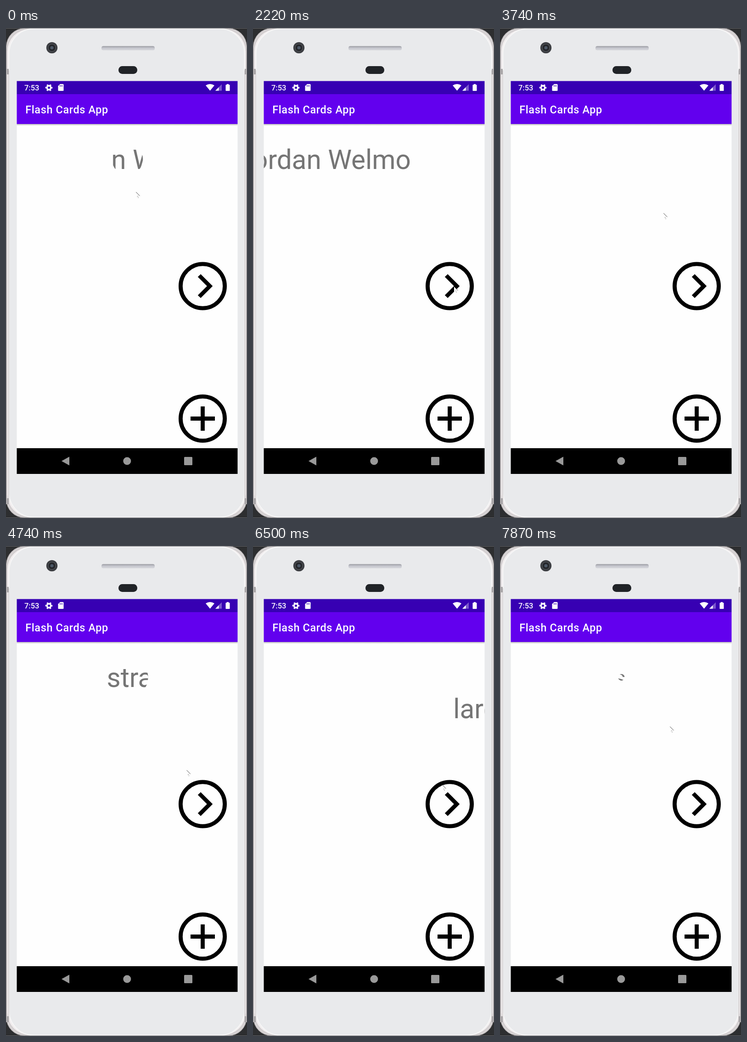
An HTML page that plays this animation: 525x1067 px, repeating every 7990 ms.

```html
<!DOCTYPE html>
<html lang="en">
<head>
<meta charset="utf-8">
<title>Flash cards</title>
<style>
  html, body { margin: 0; width: 100%; height: 100%; overflow: hidden; background: #2d2e30; }
  svg { display: block; width: 100%; height: 100%; font-family: Roboto, sans-serif; }
  #card { font-size: 58.45px; fill: #757575; text-anchor: middle; }
  .bar { fill: #fff; font-weight: 500; }
  .button { fill: none; stroke: #000; stroke-width: 8.8; }
</style>
</head>
<body>
<svg viewBox="0 0 525 1067">
  <defs>
    <linearGradient id="shade" x2="0" y2="1">
      <stop stop-color="#b8b8b8"/><stop offset="1" stop-color="#fefefe"/>
    </linearGradient>
    <linearGradient id="slot" x2="0" y2="1">
      <stop stop-color="#93949b"/><stop offset=".4" stop-color="#c3c4cb"/><stop offset="1" stop-color="#d6d7dc"/>
    </linearGradient>
    <clipPath id="screen"><path d="M23.5 209h481v706h-481z"/></clipPath>
    <clipPath id="reveal"><circle id="hole" cx="264.5" cy="286"/></clipPath>
  </defs>

  <!-- phone body -->
  <rect x=".5" y=".5" width="524" height="1066" rx="40" fill="#d6d2d3" stroke="#8d898b"/>
  <rect x="2" y="1.5" width="521" height="1064" rx="50" fill="#f1edee" stroke="#c4c0c2"/>
  <rect x="6.5" y="1.5" width="513" height="1064" rx="54" fill="#e9eaec" stroke="#f7f7f7" stroke-width="2"/>
  <path d="M6 92V1036M520 92V1036" stroke="#b5b1b3"/>
  <path d="M0 89h6v12H0zM0 1024h6v13H0zM520 89h5v12h-5zM520 1024h5v13h-5z" fill="#aaa7a9"/>
  <path d="M0 .5H525M0 1066.5H525" stroke="#66676a"/>
  <circle cx="100" cy="43" r="12.2" fill="#3c3e42"/>
  <circle cx="100" cy="43" r="8" fill="#24262a" stroke="#5b5e63"/>
  <circle cx="100" cy="43" r="3.6" fill="#4d5866"/>
  <rect x="208" y="39.5" width="116" height="9" rx="4" fill="url(#slot)"/>
  <rect x="245" y="83" width="41" height="17" rx="8.2" fill="#202327"/>

  <!-- screen -->
  <path d="M23.5 115.5h481V971h-481z" fill="#fefefe"/>
  <path d="M23.5 115.5h481V144h-481z" fill="#3700b3"/>
  <path d="M23.5 144h481v65h-481z" fill="#6200ee"/>
  <path d="M23.5 209h481v4h-481z" fill="url(#shade)"/>
  <path d="M23.5 915h481v56h-481z"/>
  <text class="bar" x="40" y="136" font-size="16.4">7:53</text>
  <text class="bar" x="42.2" y="186" font-size="23.4" letter-spacing=".65">Flash Cards App</text>
  <g fill="#fff">
    <circle cx="93.5" cy="130" r="4.2" fill="none" stroke="#fff" stroke-width="3.4"/>
    <circle cx="93.5" cy="130" r="6.7" fill="none" stroke="#fff" stroke-width="2.2" stroke-dasharray="3.5 3.516" stroke-dashoffset="1.75"/>
    <path d="M118 122h6q1.5 0 1.5 1.5v12q0 1.5-1.5 1.5h-9q-1.5 0-1.5-1.5V126.5z"/>
    <path d="M435 125q9.5-6 19 0L444.500 136.5z"/>
    <path d="M470 122.5V136.5H456z" opacity=".35"/>
    <path d="M463.5 129V136.5H456z"/>
    <path d="M481 122h4v1.5h1.5q1 0 1 1v11.5q0 1-1 1h-7q-1 0-1-1V124.5q0-1 1-1H481z"/>
  </g>
  <path d="M117.5 124.5v3m2.5-3v3m2.5-3v3" stroke="#3700b3" stroke-width="1.2"/>
  <g fill="#999">
    <path d="M121 943L138 933.5V952.5z"/>
    <circle cx="263.8" cy="943" r="8.5"/>
    <rect x="388" y="934" width="18" height="18" rx="1.5"/>
  </g>

  <g clip-path="url(#screen)"><g id="slide"><g id="card" clip-path="url(#reveal)"></g></g></g>

  <g class="button">
    <circle cx="428.5" cy="562" r="48.1"/>
    <path d="M421 539L444 562L421 585"/>
    <circle cx="428.5" cy="850.5" r="48.1"/>
    <path d="M402 850.5h53M428.5 824v53"/>
  </g>

  <g id="cursor">
    <path d="M0 0V12L2.8 9.6L4.6 14L6.6 13.2L4.8 8.9H8.5z" fill="#fefefe"/>
    <path d="M.3 .3L8.3 8.5" stroke="#333" stroke-width=".9"/>
    <path d="M2.3 10.3q1-1.8 3-.8M4 12.2l2 .2" fill="none" stroke="#777" stroke-width=".8"/>
  </g>
</svg>
<script>
const LOOP = 7990, WIDTH = 481, SLIDE = 500, REVEAL = 3000, RADIUS = 293;
const $ = id => document.getElementById(id);

// The screen refreshes at a steady step, restarting at each beat
const STEP = 130, beats = [0, 2220, 3740, 5710, 6500, 7440];

// Questions slide in; answers open as a circle and slide out
const cards = [
  { lines: ["Gordan Welmo"], end: 2570, reveal: -662, out: 2059 },
  { lines: ["What is the", "smallest", "continent?"], end: 3740, enter: 2582 },
  { lines: ["Australia"], end: 6360, reveal: 3881, out: 5846 },
  { lines: ["What is the", "largest continent?"], end: 7440, enter: 6369 },
  { lines: ["Asia"], end: LOOP, reveal: 7530 }
];

// Cursor glides; it rests in between
const home = { x: 283, y: 357 };
const glides = [
  { from: 0, to: 550, x: 405, y: 757 },
  { from: 550, to: 1300, x: 438, y: 563 },
  { from: 2400, to: 3000, x: 377, y: 389 },
  { from: 3000, to: 3310, x: 356, y: 403 },
  { from: 4050, to: 5200, x: 426, y: 562 },
  { from: 6250, to: 7000, x: 370, y: 393 }
];

const ease = (t, length) => (1 - Math.cos(Math.PI * Math.min(1, Math.max(0, t / length)))) / 2;

function snap(t) {
  const beat = beats.findLast(b => b <= t);
  return beat + Math.floor((t - beat) / STEP) * STEP;
}

function cursorAt(t) {
  return glides.reduce((p, g) => {
    const k = ease(t - g.from, g.to - g.from);
    return { x: p.x + (g.x - p.x) * k, y: p.y + (g.y - p.y) * k };
  }, home);
}

let shown;
function setCard(card) {
  if (card === shown) return;
  shown = card;
  $("card").innerHTML = card.lines
    .map((line, i) => `<text x="264.5" y="${306.5 + i * 68.5}">${line}</text>`).join("");
}

function draw(now) {
  const t = snap(now % LOOP);
  const card = cards.find(c => t < c.end);
  setCard(card);
  let x = 0, radius = 1000;
  if ("enter" in card) x = WIDTH * (1 - ease(t - card.enter, SLIDE));
  if ("out" in card) x = -WIDTH * ease(t - card.out, SLIDE);
  if ("reveal" in card) radius = RADIUS * ease(t - card.reveal, REVEAL);
  const tip = cursorAt(t);
  $("slide").setAttribute("transform", `translate(${x})`);
  $("hole").setAttribute("r", radius);
  $("cursor").setAttribute("transform", `translate(${tip.x} ${tip.y})`);
}

const start = performance.now();
function tick() {
  draw(performance.now() - start);
  requestAnimationFrame(tick);
}
tick();
</script>
</body>
</html>
```
